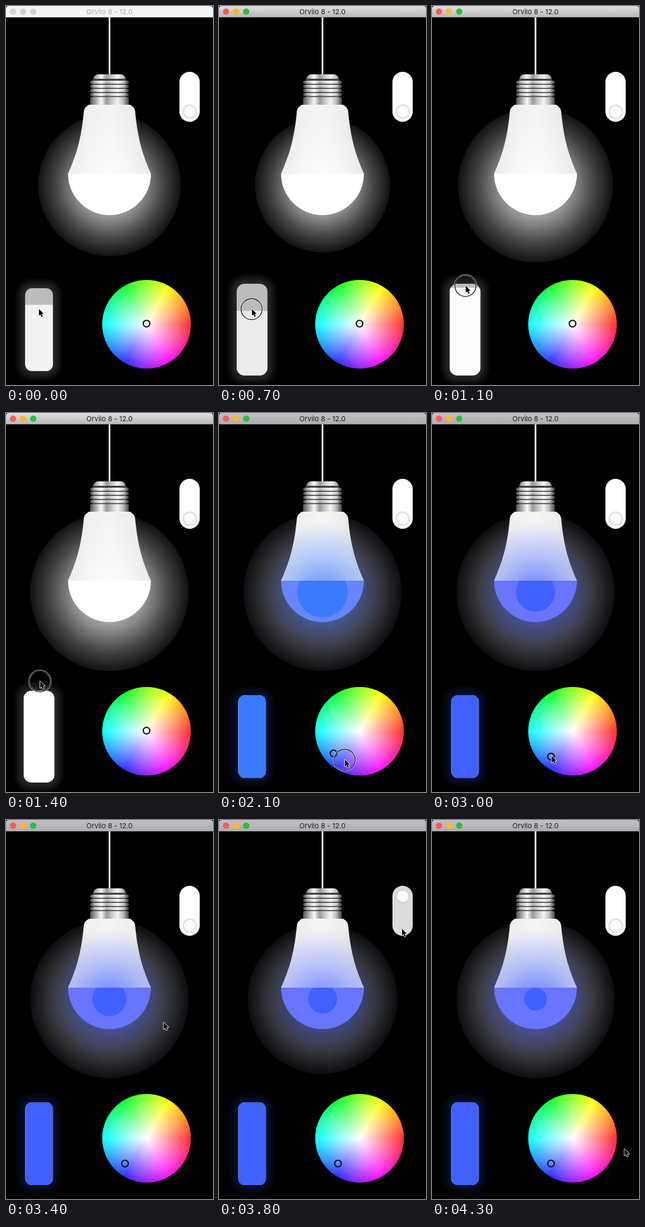
Animation, 327 px wide and 599 px high, one loop 4.4 s. Source, as an HTML page with a canvas:

```html
<!DOCTYPE html>
<html lang="en">
<head>
<meta charset="utf-8">
<title>Smart bulb</title>
<style>
html, body { margin: 0; width: 100%; height: 100%; overflow: hidden; background: #000; }
canvas { position: absolute; left: 0; top: 0; width: 327px; height: 599px; }
#bar {
  position: absolute; left: 0; top: 0; width: 327px; height: 18px;
  border-radius: 4px 4px 0 0; box-sizing: border-box; border-bottom: 1px solid #98969c;
  background: linear-gradient(#dedede, #bababa);
  font: 11px/18px Inter, "Liberation Sans", sans-serif; color: #1c1c1c; text-align: center;
}
#bar.late { background: linear-gradient(#c2c0c4, #afadb2); }
#bar.idle { background: #f5f5f5; border-color: #ddd; color: #aaa; }
#bar i { position: absolute; top: 4px; width: 10px; height: 10px; border-radius: 50%; }
#bar i:nth-of-type(1) { left: 6px; background: #fc5b57; }
#bar i:nth-of-type(2) { left: 22px; background: #f9b82f; }
#bar i:nth-of-type(3) { left: 38px; background: #2dbb43; }
#bar.idle i { background: #d2d2d2; }
</style>
</head>
<body>
<canvas id="stage"></canvas>
<div id="bar"><i></i><i></i><i></i>Orvilo 8 - 12.0</div>
<script>
const LOOP = 4400, STEP = 100, TAU = Math.PI * 2;
const CX = 163.5, RIM = 265, GLOW_Y = 283;
const WHEEL = { x: 222, y: 503, r: 70 };
const WHITE = [255, 255, 255], BLACK = [0, 0, 0];
const bar = document.getElementById('bar');
const canvas = document.getElementById('stage');
const c = canvas.getContext('2d');
const dpr = window.devicePixelRatio || 1;
canvas.width = 327 * dpr;
canvas.height = 599 * dpr;

const clamp = v => Math.min(1, Math.max(0, v));
const span = (t, from, to) => clamp((t - from) / (to - from));
const mix = (a, b, k) => a.map((x, i) => x + (b[i] - x) * k);
const rgba = (v, a = 1) => `rgba(${v.map(Math.round).join()},${a})`;

// Pointer legs: from ms, to ms, target point
const legs = [
  [700, 1300, [54, 424]], [1500, 2000, [199, 548]], [2200, 2500, [189, 542]],
  [3100, 3600, [289, 172]], [4000, 4300, [304, 520]]
];
const pointer = t => legs.reduce((p, [a, b, to]) => mix(p, to, span(t, a, b)), [52, 479]);

// The picker trails the pointer, then settles beside it
const picker = t => mix(mix([222, 502], [181, 538], span(t, 1800, 2100)), [188, 543], span(t, 2100, 2500));

function pickColor([x, y]) {
  const dx = x - WHEEL.x, dy = WHEEL.y - y;
  const sat = clamp(Math.hypot(dx, dy) / WHEEL.r);
  if (sat < .05) return { col: WHITE, sat: 0 };
  const turn = Math.atan2(dy, dx) / TAU * 6 + 6;
  const pure = [0, 4, 2].map(k => 255 * clamp(Math.abs((turn + k) % 6 - 3) - 1));
  return { col: mix(WHITE, pure, sat), sat };
}

function stops(g, ...colors) {
  colors.forEach((col, i) => g.addColorStop(i / (colors.length - 1), col));
  return g;
}
const radial = (x, y, r, ...colors) => stops(c.createRadialGradient(x, y, 0, x, y, r), ...colors);
const across = (x0, x1, ...colors) => stops(c.createLinearGradient(x0, 0, x1, 0), ...colors);

function disc(x, y, r, fill) {
  c.beginPath();
  c.arc(x, y, r, 0, TAU);
  c.fillStyle = fill;
  c.fill();
}
function ring(x, y, r, width, stroke) {
  c.beginPath();
  c.arc(x, y, r, 0, TAU);
  c.lineWidth = width;
  c.strokeStyle = stroke;
  c.stroke();
}
function pill(x, y, w, h, r, fill) {
  c.beginPath();
  c.roundRect(x, y, w, h, r);
  c.fillStyle = fill;
  c.fill();
}

function drawGlow(r, col, sat, lit) {
  const near = mix(col, [165, 165, 200], sat * .8);
  const far = mix(WHITE, [170, 175, 205], sat);
  disc(CX, GLOW_Y, r, radial(CX, GLOW_Y, r,
    rgba(col, .95 * lit), rgba(mix(col, near, .5), .75 * lit), rgba(near, .53 * lit),
    rgba(far, .27 * lit), rgba(far, .07 * lit)));
}

function drawSocket() {
  c.fillStyle = '#c4c4c4';
  c.fillRect(162, 18, 3, 92);
  c.fillStyle = '#fff';
  c.fillRect(163, 18, 1, 92);
  const metal = across(133, 194, '#555', '#aaa', '#fafafa', '#999', '#ccc', '#f4f4f4', '#bbb', '#444');
  pill(138, 108, 51, 12, [8, 8, 0, 0], metal);
  pill(137, 115, 53, 30, 2, '#444');
  for (let y = 118; y < 142; y += 6.5) {
    pill(133, y, 61, 5, 2.5, metal);
    pill(138, y + 1, 50, 1.6, 1, 'rgba(255,255,255,.6)');
  }
  pill(133, 144, 61, 13, 2, metal);
}

function drawBulb(col, sat, core, lit) {
  c.beginPath();
  c.moveTo(98, RIM);
  c.bezierCurveTo(110, 238, 119, 212, 123, 166);
  c.quadraticCurveTo(124, 160, 131, 156);
  c.lineTo(196, 156);
  c.quadraticCurveTo(203, 160, 204, 166);
  c.bezierCurveTo(208, 212, 217, 238, 229, RIM);
  c.fillStyle = across(98, 229, '#e4e4e4', '#f0f0f0', '#f5f5f5', '#eee', '#e0e0e0');
  c.fill();
  c.fillStyle = radial(CX, GLOW_Y, 110, rgba(col, .8 * lit), rgba(col, .36 * lit), rgba(col, 0));
  c.fill();

  c.save();
  c.beginPath();
  c.arc(CX, RIM, 65.5, 0, Math.PI);
  c.fillStyle = rgba(mix(col, [170, 150, 255], sat * .5));
  c.fill();
  c.clip();
  disc(CX, GLOW_Y, core, rgba(col));
  c.restore();
}

function drawSlider(press, level, col) {
  const s = 1 + press * .105, w = 44 * s, h = 131 * s;
  const x = 52.2 - w / 2, y = 511.5 - h / 2, r = 11 * s;
  for (let d = 16; d > 0; d -= 2) {
    pill(x - d, y - d, w + 2 * d, h + 2 * d, r + d, rgba(col, .018));
  }
  c.save();
  pill(x, y, w, h, r, '#bcbcbc');
  c.clip();
  c.fillStyle = rgba(mix(col, BLACK, (1 - level) * .26));
  c.fillRect(x, y + h * (1 - level), w, h * level + 1);
  c.restore();
}

function drawWheel(x, y) {
  const hues = c.createConicGradient(0, WHEEL.x, WHEEL.y);
  disc(WHEEL.x, WHEEL.y, WHEEL.r, stops(hues, '#f22', '#f0f', '#22f', '#0ff', '#0f2', '#ff0', '#f22'));
  disc(WHEEL.x, WHEEL.y, WHEEL.r,
    radial(WHEEL.x, WHEEL.y, WHEEL.r, '#fff', rgba(WHITE, .06)));
  ring(x, y, 5.2, 2, '#151515');
}

function drawSwitch(up) {
  const y = 167 - 46.5 * up;
  pill(274, 104, 32, 79, 16, rgba(mix(WHITE, [220, 220, 220], up)));
  disc(290.3, y, 11.5, rgba([226, 226, 226].map(v => v - 14 * up)));
  disc(290.3, y, 9, '#fbfbfd');
}

function drawCursor(x, y) {
  c.save();
  c.translate(x, y);
  c.scale(.88, .88);
  const arrow = new Path2D('M0 0V12L2.7 9.6L4.6 14L6.8 13L4.9 8.8L8.6 8.6Z');
  c.lineJoin = 'round';
  c.lineWidth = 1.6;
  c.strokeStyle = '#fff';
  c.stroke(arrow);
  c.fillStyle = '#000';
  c.fill(arrow);
  c.restore();
}

function draw(t) {
  const [x, y] = pointer(t), pick = picker(t), { col, sat } = pickColor(pick);
  const sliding = t >= 400 && t < 1500, picking = t >= 1900 && t < 2500;
  const level = sliding ? clamp((581 - y) / 145) : t < 400 ? .8 : 1;
  const press = span(t, 300, 500) - span(t, 1500, 1700);
  const up = span(t, 3600, 3800) - span(t, 4100, 4300);
  const dim = span(t, 3700, 4000) - span(t, 4000, 4300);
  const lit = 1 - .25 * dim;

  bar.className = t < 400 ? 'idle' : t < 1900 ? '' : 'late';
  c.setTransform(dpr, 0, 0, dpr, 0, 0);
  c.fillStyle = '#000';
  c.fillRect(0, 0, 327, 599);
  drawGlow((63 + 62 * level) * (1 - .16 * dim), col, sat, lit);
  drawSocket();
  drawBulb(col, sat, 40 - Math.max(0, t - 2100) / 100, lit);
  drawSwitch(up);
  drawSlider(press, level, col);
  drawWheel(...pick);
  if (sliding || picking) {
    ring(x - .5, y, 17, 2.6, 'rgba(255,255,255,.6)');
    ring(x - .5, y, 16.7, 1.2, '#111');
  }
  drawCursor(x, y);
}

const start = performance.now();
let shown = -1;
function tick() {
  const t = Math.floor((performance.now() - start) % LOOP / STEP) * STEP;
  if (t !== shown) draw(shown = t);
  requestAnimationFrame(tick);
}
tick();
</script>
</body>
</html>
```
